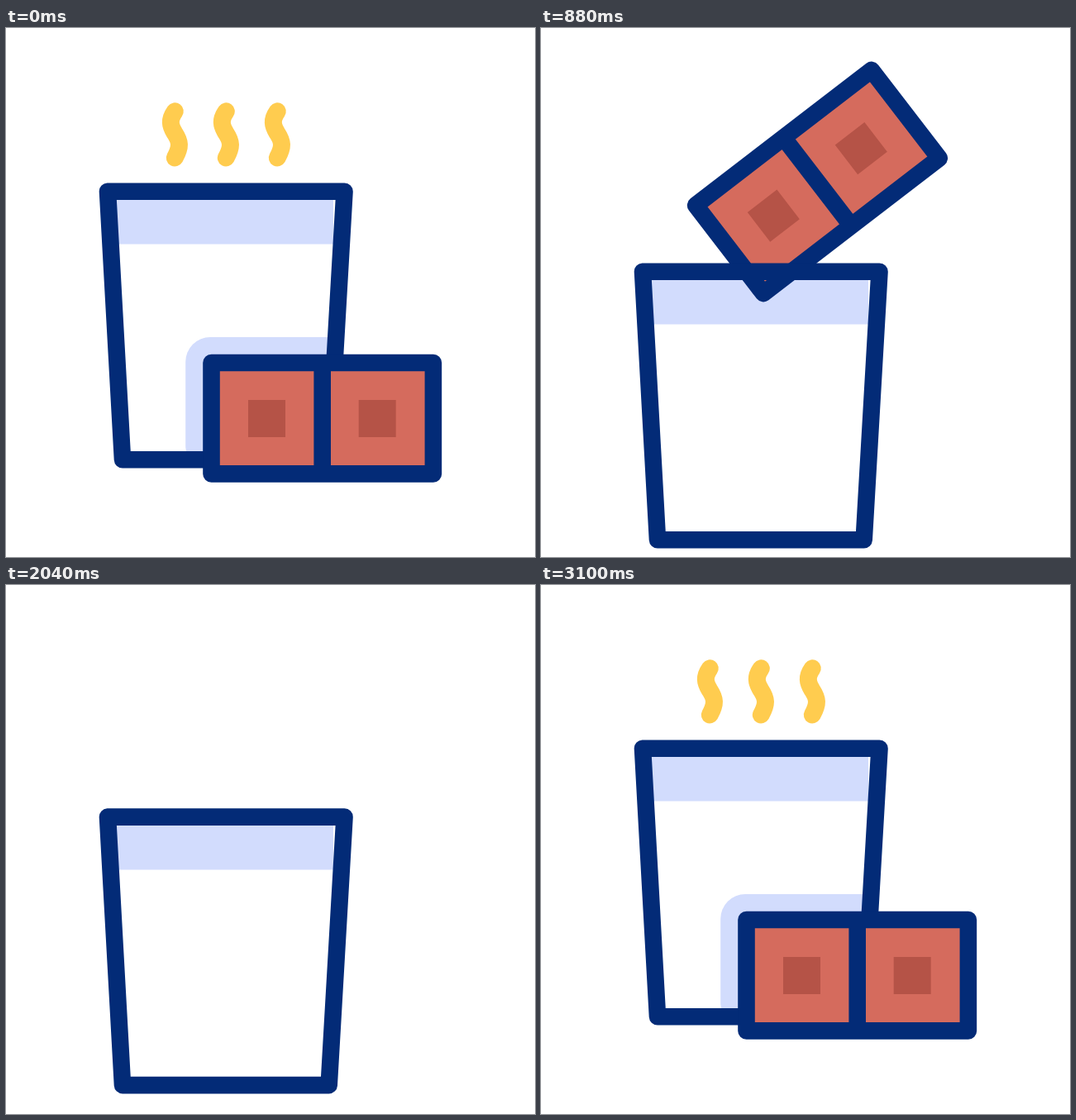
Recreate the animation shown at these times as an HTML page. Size 640x640 px, loop 3.28 s.

```html
<!DOCTYPE html>
<html lang="en">
<head>
<meta charset="utf-8">
<title>Milk and chocolate</title>
<style>
  html, body { margin: 0; width: 100%; height: 100%; overflow: hidden; background: #fff; }
  svg { display: block; width: 100%; height: 100%; }
  .line { fill: none; stroke: #032b77; stroke-width: 20.6; stroke-linejoin: round; }
  .steam { fill: none; stroke: #ffcc4f; stroke-width: 21; stroke-linecap: round; }
  .pale { fill: #d2dcfd; }
</style>
</head>
<body>
<svg viewBox="0 0 640 640">
  <defs>
    <path id="glass" d="M123 197.7H409.5L390.7 522.2H141Z"/>
    <clipPath id="inside"><use id="insideShape" href="#glass"/></clipPath>
    <clipPath id="glassClip"><use href="#glass"/></clipPath>
    <clipPath id="aboveMilk"><path id="airShape"/></clipPath>
    <path id="wisp" pathLength="1" d="M204.3 100.8C197 111 198.5 118 204 127C211 137.5 211.5 144 204.3 157"/>
    <g id="bar">
      <rect x="-134.2" y="-67.2" width="268.4" height="134.4" fill="#d56b5d"/>
      <path d="M-89.7 -22.3h45v45h-45zM44 -22.3h45v45h-45z" fill="#b55347"/>
      <path class="line" d="M-134.2 -67.2H134.2V67.2H-134.2ZM0 -67.2V67.2"/>
    </g>
  </defs>
  <g id="steam" class="steam">
    <use href="#wisp"/><use href="#wisp" x="62"/><use href="#wisp" x="124"/>
  </g>
  <g class="cup"><g clip-path="url(#glassClip)"><path id="band" class="pale"/></g></g>
  <g clip-path="url(#inside)">
    <rect id="halo" class="pale" x="-165.5" y="-98.3" width="300" height="161" rx="30"/>
  </g>
  <g clip-path="url(#aboveMilk)"><use id="barBehind" href="#bar"/></g>
  <g class="cup"><use class="line" href="#glass"/></g>
  <use id="barFront" href="#bar"/>
</svg>
<script>
const LOOP = 3280, DIVE = 750, SUNK = 1420, RETURN = 1900;
const REST = { x: 382.7, y: 472.2 };
const $ = id => document.getElementById(id);
const cups = document.querySelectorAll('.cup');

// time, x, y, angle relative to the resting bar
const barKeys = [
  [150, 0, 0, 0], [400, -10, -114.6, -11.8], [540, -23, -223, -20.5],
  [DIVE, -36, -316, -31.5], [880, -48.1, -286.6, -37.5], [1080, -88, -154, -53],
  [1240, -116, -48.7, -68.3], [SUNK, -126, 62, -80]
];
// time, shift at the glass walls, extra shift in the middle
const milkKeys = [
  [900, 0, 0], [1240, -11.5, -10], [1500, 3, 6], [1700, -2, -3], [1900, 0, 0]
];

function ease(t, from, to) {
  const u = Math.min(1, Math.max(0, (t - from) / (to - from)));
  return u * u * (3 - 2 * u);
}

// Smooth curve through the keys, at rest on both ends
function track(keys, t) {
  const last = keys.length - 1;
  if (t <= keys[0][0]) return keys[0].slice(1);
  if (t >= keys[last][0]) return keys[last].slice(1);
  const i = keys.findIndex(k => k[0] > t) - 1;
  const span = n => keys[n + 1][0] - keys[n][0];
  const rate = (n, c) => (keys[n + 1][c] - keys[n][c]) / span(n);
  const slope = (n, c) => n === 0 || n === last ? 0 :
    (rate(n - 1, c) * span(n) + rate(n, c) * span(n - 1)) / (span(n - 1) + span(n));
  const h = span(i), u = (t - keys[i][0]) / h, v = 1 - u;
  return keys[i].slice(1).map((a, n) => {
    const c = n + 1, b = keys[i + 1][c];
    return v * v * (1 + 2 * u) * a + u * u * (3 - 2 * u) * b
      + h * u * v * (v * slope(i, c) - u * slope(i + 1, c));
  });
}

function show(el, on) { el.setAttribute('visibility', on ? 'visible' : 'hidden'); }

function drawSteam(t) {
  const leaving = t < 420, arriving = t > 2500;
  const start = leaving ? 0 : 1 - ease(t, 2500, 3100);
  const length = leaving ? 1 - ease(t, 60, 420) : 1 - start;
  const steam = $('steam');
  show(steam, leaving || arriving);
  steam.setAttribute('stroke-dasharray', `${length} 3`);
  steam.setAttribute('stroke-dashoffset', -start);
}

function drawCup(t) {
  const drop = 97 * (ease(t, 262, 645) - ease(t, 1897, 2497));
  const move = `translate(0 ${drop})`;
  cups.forEach(cup => cup.setAttribute('transform', move));
  $('insideShape').setAttribute('transform', move);
  const [edge, hump] = track(milkKeys, t);
  const level = 261.6 + edge;
  const surface = y => `V${level + y}Q266 ${level + 2 * hump + y} 136 ${level + y}`;
  $('band').setAttribute('d', `M120 190H396${surface(0)}H120Z`);
  $('airShape').setAttribute('d', `M0 -50H640V${level + drop}H396${surface(drop)}H0Z`);
}

function drawBar(t) {
  const away = t >= RETURN;
  const [x, y, angle] = away ? [458 * (1 - ease(t, RETURN, 2900)), 0, 0] : track(barKeys, t);
  const pose = `translate(${REST.x + x} ${REST.y + y}) rotate(${angle})`;
  const front = t < DIVE || away;
  for (const id of ['halo', 'barBehind', 'barFront']) $(id).setAttribute('transform', pose);
  show($('halo'), front);
  show($('barFront'), front);
  show($('barBehind'), !front && t < SUNK);
}

function render(t) {
  drawSteam(t);
  drawCup(t);
  drawBar(t);
}

const began = performance.now();
function tick() {
  render((performance.now() - began) % LOOP);
  requestAnimationFrame(tick);
}
render(0);
requestAnimationFrame(tick);
</script>
</body>
</html>
```
